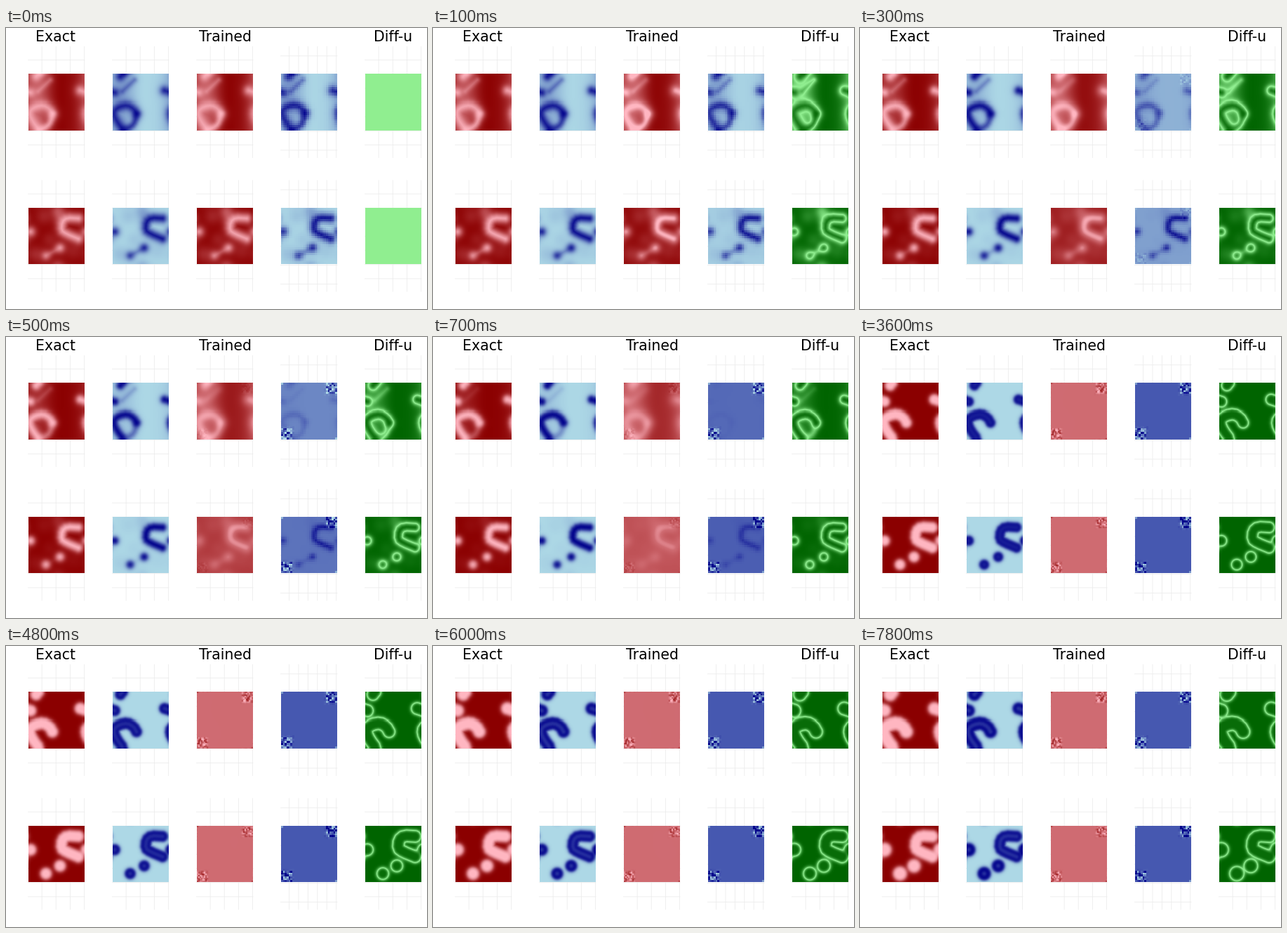
Animation of 600x400 px, one loop 8000 ms. Source, as a matplotlib script:

```python
import numpy as np
import matplotlib.pyplot as plt
from matplotlib.animation import FuncAnimation
from matplotlib.colors import LinearSegmentedColormap

W, H, DPI = 600, 400, 100
FRAMES, STEP = 80, 100
N, COARSE = 80, 30
SIDE = 80.5
LEFTS = [32 + 120 * i for i in range(5)]
ROWS = [(65, 146), (256, 336)]
LEVEL = 0.59  # value the trained fields settle on

RED = LinearSegmentedColormap.from_list("red", ["darkred", "lightpink"])
BLUE = LinearSegmentedColormap.from_list("blue", ["lightblue", "darkblue"])
GREEN = LinearSegmentedColormap.from_list("green", ["darkgreen", "lightgreen"])

X, Y = np.meshgrid(np.arange(N) + 0.5, np.arange(N) + 0.5)
PICK = ((np.arange(COARSE) + 0.5) * N / COARSE).astype(int)
rng = np.random.default_rng(7)


def rounded(points):
    """Cut the corners of a polyline."""
    p = np.array(points, float)
    a = 0.75 * p[:-1] + 0.25 * p[1:]
    b = 0.25 * p[:-1] + 0.75 * p[1:]
    inner = np.stack([a, b], axis=1).reshape(-1, 2)
    return [p[0], *inner, p[-1]]


def path_dist(points):
    """Distance to a rounded polyline on the periodic square."""
    best = np.full((N, N), 1e3)
    points = rounded(points) if len(points) > 1 else points * 2
    for (ax, ay), (bx, by) in zip(points, points[1:]):
        dx, dy = bx - ax, by - ay
        span = dx * dx + dy * dy or 1
        for sx in (-N, 0, N):
            for sy in (-N, 0, N):
                px, py = X - ax - sx, Y - ay - sy
                s = np.clip((px * dx + py * dy) / span, 0, 1)
                best = np.minimum(best, np.hypot(px - s * dx, py - s * dy))
    return best


def blob(x, y, size):
    return np.exp(-(path_dist([(x, y)]) / size) ** 2)


def wave(shift):
    return 0.5 + 0.5 * np.cos(2 * np.pi * (X - shift) / N)


def logistic(z):
    return 1 / (1 + np.exp(-np.clip(z, -40, 40)))


def bell(t, tau):
    return np.exp(-(t / tau) ** 2)


def union(layers):
    rest = 1
    for layer in layers:
        rest = rest * (1 - layer)
    return 1 - rest


def blur(field, sigma):
    f = np.fft.fftfreq(N)
    g = np.exp(-2 * (np.pi * sigma) ** 2 * (f[:, None] ** 2 + f ** 2))
    return np.fft.ifft2(np.fft.fft2(field) * g).real


def corner_noise(n, amp, size):
    c = (np.arange(n) + 0.5) / n
    x, y = np.meshgrid(c, c)
    mask = 0
    for cx, cy in ((0.9, 0.1), (0.1, 0.9)):
        d = np.maximum(abs(x - cx), abs(y - cy))
        mask = mask + np.clip((size + 0.02 - d) / 0.05, 0, 1)
    noise = amp * rng.uniform(-1, 1, (n, n)) * mask
    noise[0, 0] = noise[-1, -1] = -0.3
    return noise


class Scene:
    """shapes: (points, largest radius, starting strength);
    fading: (points, radius, strength, decay time)."""

    def __init__(self, shapes, fading, haze, red_tau, blue_tau, mark_tau):
        self.shapes = [(path_dist(p), cap, amp) for p, cap, amp in shapes]
        self.fading = [(path_dist(p), r, amp, tau) for p, r, amp, tau in fading]
        self.haze = haze
        self.red_tau, self.blue_tau, self.mark_tau = red_tau, blue_tau, mark_tau
        self.u0, self.v0 = self.exact(0)
        self.rough_v = corner_noise(COARSE, 0.65, 0.1)
        fine = corner_noise(40, 0.5, 0.095)
        self.rough_u = blur(np.kron(fine, np.ones((2, 2))), 0.6)

    def exact(self, t):
        width = 1.6 + 1.4 * np.exp(-t / 0.6)
        u, v = [], []
        for d, cap, amp in self.shapes:
            r = min(5.2 + 0.62 * t, cap)
            gain = 1 - (1 - amp) * np.exp(-t / 0.5)
            dip = 0.24 * np.clip((r - 5.5) / 3, 0, 1) * np.exp(-(d / 4) ** 2)
            u.append(gain * logistic((r - d) / width))
            v.append(gain * logistic((r - 0.5 - d) / (width - 0.3)) - dip)
        for d, r, amp, tau in self.fading:
            soft = amp * bell(t, tau) * logistic((r - d) / 1.8)
            u.append(soft)
            v.append(0.85 * soft)
        haze = self.haze * np.exp(-t / 0.6)
        u.append(haze)
        v.append(0.5 * haze)
        return np.clip(1.04 * union(u), 0, 1), np.clip(1.04 * union(v), 0, 1)

    def trained_u(self, t):
        if t == 0:
            return self.u0
        u = blur(self.u0, 4.2 * np.sqrt(t)) - LEVEL
        tail = 0.12 * np.exp(-t / 1.2)
        low = 0.88 * bell(t, self.red_tau) + tail
        high = 1.5 * bell(t, 1) + tail
        u = LEVEL + np.where(u < 0, u * low, u * high)
        return u + self.rough_u * np.clip((t - 0.3) / 1.2, 0, 1)

    def trained_v(self, t):
        mark = self.v0[np.ix_(PICK, PICK)]
        mark = mark ** (1 + min(2 * t, 1))
        base = LEVEL * (1 - bell(t, self.blue_tau))
        v = base + mark * bell(t, self.mark_tau)
        return v + self.rough_v * np.clip((t - 0.15) / 0.35, 0, 1) ** 2

    def fields(self, t):
        u, v = self.exact(t)
        if t == 0:
            gap = np.ones_like(u)
        else:
            gap = np.clip(1 - abs(u - 0.5) / 0.5, 0, 1) ** 1.25 + 0.06 * u
        return u, v, self.trained_u(t), self.trained_v(t), gap


hook = [(34, 56), (30, 49), (21, 44), (10, 46), (3, 51), (2, 58), (6, 67),
        (15, 79), (11, 84)]
bean = [(74, 24), (83, 27)]
curl = [(71, 15), (55, 14), (48, 20), (47, 32), (54, 37), (71, 44)]

upper = Scene(
    [(hook, 9.4, 0.9), (bean, 9, 0.9)],
    [([(34, 56), (32, 67), (27, 74), (16, 79)], 4, 0.85, 0.75),
     ([(14, 25), (31, 9)], 3, 0.5, 0.6)],
    0.4 * wave(14) ** 1.5 + 0.08 * wave(75),
    1.1, 0.5, 0.38)
lower = Scene(
    [(curl, 8.4, 1), ([(3, 34)], 10, 0.9),
     ([(45, 57)], 9.6, 0.8), ([(25, 68)], 11, 0.6)],
    [([(25, 68), (45, 57)], 3, 0.4, 0.4)],
    0.35 * blob(42, 4, 10) + 0.2 * blob(45, 15, 10) + 0.18 * blob(22, 12, 12)
    + 0.14 * blob(64, 62, 13) + 0.2 * blob(10, 66, 12) + 0.14 * blob(30, 45, 11),
    0.58, 0.4, 0.6)

fig = plt.figure(figsize=(W / DPI, H / DPI), dpi=DPI, facecolor="white")
ax = fig.add_axes([0, 0, 1, 1])
ax.axis("off")


def draw_grid(left, mid, n, x_step, y_step):
    cell = SIDE / n
    style = dict(color="#ececec", lw=0.6, zorder=1, snap=False)
    for tick in range(x_step, n + 1, x_step):
        x = left + (tick - 0.5) * cell
        ax.plot([x, x], [mid - 79, mid + 79], **style)
    for tick in range(-n, 2 * n, y_step):
        y = mid + SIDE / 2 - (tick - 0.5) * cell
        if abs(y - mid) < 79:
            ax.plot([left, left + SIDE], [y, y], **style)


images = []
for top, bottom in ROWS:
    for col, (left, cmap) in enumerate(zip(LEFTS, (RED, BLUE, RED, BLUE, GREEN))):
        n, x_step, y_step = (COARSE, 5, 10) if col == 3 else (N, 20, 20)
        draw_grid(left - 0.5, (top + bottom) / 2, n, x_step, y_step)
        images.append(ax.imshow(
            np.zeros((n, n)), cmap=cmap, vmin=0, vmax=1, zorder=2,
            interpolation="nearest", aspect="auto",
            extent=(left, left + 80, bottom, top)))

for x, label in ((71, "Exact"), (312.5, "Trained"), (551.5, "Diff-u")):
    ax.text(x, 19.2, label, ha="center", va="baseline", fontsize=14.8,
            family="DejaVu Sans", color="black")

ax.set_xlim(0, W)
ax.set_ylim(H, 0)


def update(i):
    t = i * STEP / 1000
    for image, field in zip(images, upper.fields(t) + lower.fields(t)):
        image.set_data(np.clip(field, 0, 1))
    return images


anim = FuncAnimation(fig, update, frames=FRAMES, interval=STEP,
                     repeat=True, repeat_delay=0, blit=False)
plt.show()
```
